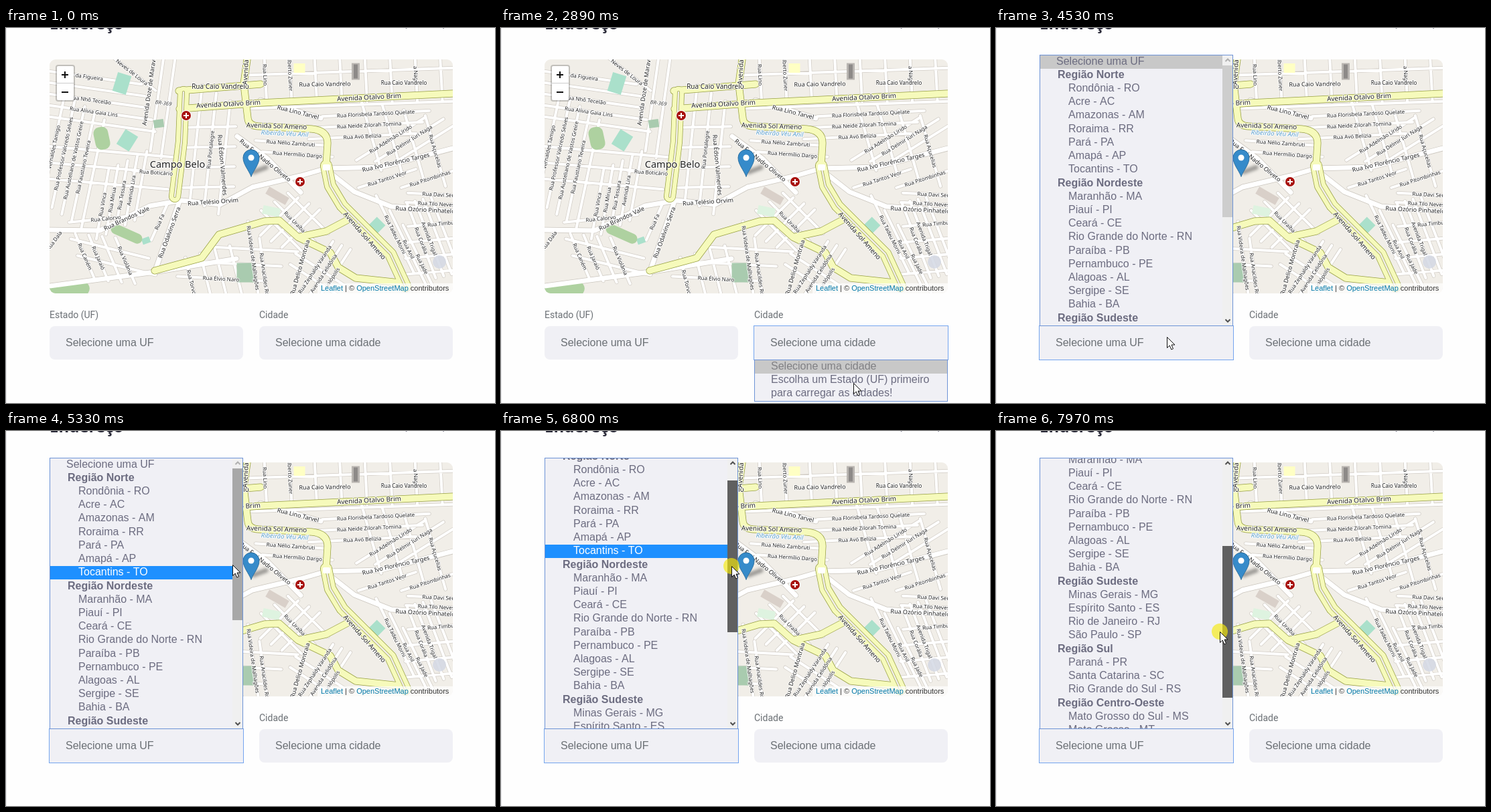
These frames come from a looping animation (730x561 px, 8000 ms). An HTML page with a canvas:

```html
<!DOCTYPE html>
<html lang="pt-BR">
<head>
<meta charset="utf-8">
<title>Endereço</title>
<style>
html, body { margin: 0; width: 100%; height: 100%; overflow: hidden; background: #fefefe; }
canvas { display: block; }
</style>
</head>
<body>
<canvas id="stage" width="730" height="561"></canvas>
<script>
const stage = document.getElementById('stage').getContext('2d');
const LOOP = 8000;
const ARIAL = '"Liberation Sans", Arial, sans-serif';
const NOTO = '"Noto Sans", sans-serif';
const ROBOTO = '14px Roboto, sans-serif';
const within = (t, from, to) => t >= from && t < to;

function text(c, str, x, y, font, color, align = 'left') {
  c.font = font;
  c.fillStyle = color;
  c.textAlign = align;
  c.fillText(str, x, y);
}

function box(c, x, y, w, h, fill, radius = 0) {
  c.fillStyle = fill;
  c.beginPath();
  c.roundRect(x, y, w, h, radius);
  c.fill();
}

function frame(c, x, y, w, h, color) {
  c.strokeStyle = color;
  c.lineWidth = 1;
  c.strokeRect(x + .5, y + .5, w - 1, h - 1);
}

function disc(c, x, y, r, fill) {
  c.fillStyle = fill;
  c.beginPath();
  c.arc(x, y, r, 0, 7);
  c.fill();
}

function line(c, path, width, color) {
  c.lineWidth = width;
  c.strokeStyle = color;
  c.stroke(path);
}

// ---------- Map ----------
const lanes = new Path2D();
const arterials = new Path2D(
  'M65 302L140 303 215 266 262 258 320 264 368 238 440 221 478 210 560 208 667 180' +
  'M345 162L390 195 440 246M258 262L222 365M65 386L222 365 344 345M380 108L470 135M478 212L520 245 575 267 667 274');
const avenues = new Path2D(
  'M259 121L380 112 667 98M258 94L380 84M360 47L355 84 361 135Q362 146 376 147L456 151Q480 153 480 172L478 206' +
  'M222 363L292 344 318 309 386 289 408 288 436 313 478 304 512 286M436 313L484 336 496 358 522 374 596 382');
const dualAvenues = new Path2D('M478 206L484 236 502 266 574 338 596 386M265 96L262 170 252 252');
const labels = [];

function label(name, x, y, angle, size = 8, color = '#222', style = '') {
  labels.push({ name, x, y, angle: angle * Math.PI / 180, font: `${style} ${size}px ${NOTO}`, color });
}

// Parallel streets, each centred on its own name; an empty name leaves the street unlabelled.
function block(names, x, y, dx, dy, angle, length) {
  const a = angle * Math.PI / 180;
  const hx = Math.cos(a) * length / 2, hy = Math.sin(a) * length / 2;
  names.split('|').forEach((name, i) => {
    const cx = x + i * dx, cy = y + i * dy;
    lanes.moveTo(cx - hx, cy - hy);
    lanes.lineTo(cx + hx, cy + hy);
    label(name, cx, cy, angle);
  });
}
const street = (name, x, y, angle, length) => block(name, x, y, 0, 0, angle, length);

function layOutStreets() {
  // North-west
  block('isco da Figueira||Rua Nhô Tecelão|Rua Alívia Gaia Lins|', 116, 72, 5, 17.7, 8, 175);
  block('Vernaldes Tamigo|Rua Professor Valcredo Selves|Rua Austeliano de Vastos Greire|Rua Faustiano Teveira|', 71, 178, 14.7, 10, -78, 165);
  block('Rua Vinca|Rua Mírua|Rua Tessara|Avenida Lira|', 144, 264, 14.3, -7, -80, 105);
  block('||', 155, 185, -4, 24, 5, 190);
  block('|', 226, 110, 16, 10, -82, 150);
  street('Rua Boticário', 224, 216, 4, 70);
  street('Neves de Loura', 188, 66, 38, 90);
  street('Rua Calorvo', 149, 285, -6, 110);
  // Centre
  block('|Rua Pontalegre|', 284, 170, 21, 12, -84, 170);
  block('||||', 306, 118, -1, 30, -1, 76);
  block('Rua Nélio Zambruti|Rua Hermílio Dargo', 425, 172, 10, 17, 4, 105);
  block('|Rua Uraíba|', 411, 303, 20, -13, 45, 85);
  block('||', 408, 282, 16, 9, -45, 80);
  // North-east
  block('Rua Lino|ilberto Zuner|||||a Naga|', 387, 70, 37.5, 0, 87, 80);
  block('|', 515, 65, 0, 50, -2, 310);
  block('Rua Florisbela Tardoso Quelate|Rua Neide Zilorah Tomina|Rua Avó Belízia', 552, 128, -10, 17, -3, 160);
  block('Rua Adelmão Lírido|Rua Delmir Iuri Naga|', 574, 166, 28, 2, -32, 120);
  block('|||Rua Açucelias', 545, 160, 32, 8, 74, 110);
  block('Rua Tantos Veor|Rua Pitombinhas', 569, 225, 64, 0, -18, 90);
  block('Rua Davi Ser|Rua Tilo Neves', 645, 249, -3, 14, 3, 90);
  // South-east
  block('Rua Timbuara|||', 655, 292, -2, 24, -5, 110);
  block('Rua Tadeu Morni|Rua Anil|Rua Jade', 581, 309, 20, 22, 64, 130);
  block('Rua Corália|Avenida Trigal||', 620, 318, 12, -3, 69, 120);
  block('Rua Zephaldy Varanda|Avenida Celidônia|valópolis', 461, 361, 13, 6, -57, 100);
  block('|', 470, 362, -8, 16, 33, 90);
  // South-west
  block('Rua Caném|Rua Jaraió||Rua Violânia', 118, 342, 20, 2, 67, 75);
  block('|', 155, 330, 10, 25, 14, 120);
  block('Rua Torvo|||', 277, 380, 22, -6, 76, 75);
  block('Rua Videira de Malhagões|Rua Anacildes Rol', 369, 344, 17, 25, 82, 110);
  block('Rua Élvio Naro||', 321, 375, 25, -22, 3, 130);
  street('Rua Dala', 72, 318, -54, 40);
  street('Rua Fa', 229, 290, -66, 60);
}

function nameAvenues() {
  label('Rua Caio Vandrelo', 320, 88, 0, 10);
  label('Avenida Otalvo Brim', 332, 114, -3, 10);
  label('Avenida Otalvo Brim', 542, 104, -3, 10);
  label('Avenida Sol Ameno', 404, 147, 2, 10);
  label('Avenida Sol Ameno', 535, 311, 49, 10);
  label('Avenida', 358, 66, -87, 10);
  // Wide white roads
  label('Rua Caio Vandrelo', 476, 84, -1, 9);
  label('Rua Caio Vandrelo', 594, 82, 0);
  label('Rua Lino Tarvel', 436, 126, 14, 9);
  label('Rua Frei Nadro Oliveto', 387, 198, 39, 9);
  label('Rua Telésio Orvim', 309, 260, -4, 9);
  label('Rua Brandos Vale', 180, 285, -25, 9);
  label('Rua Odalvino Serra', 244, 306, -70, 9);
  label('Rua Édson Valmerdes', 323, 205, 85, 9);
  label('Rua Ivo Florêncio Targes', 582, 201, -13, 9);
  label('Rua Ozório Pinhatelo', 626, 272, 3, 9);
  label('Rua Delico Montraia', 439, 358, -74, 9);
  label('Avenida Doze de Maravel', 214, 93, -82, 9);
  // Other features
  label('BR-369', 235, 112, 8, 8, '#444', 'italic');
  label('Ribeirão Véu Anil', 416, 158, 3, 9.5, '#5b9fce', 'italic');
  label('Campo Belo', 256, 206, 0, 14.5);
}

function patch(c, x, y, w, h, degrees, fill, radius = 0) {
  c.save();
  c.translate(x, y);
  c.rotate(degrees * Math.PI / 180);
  box(c, -w / 2, -h / 2, w, h, fill, radius);
  c.restore();
}

function drawAreas(c) {
  const PITCH = '#aae0cb', WOOD = '#aed1a0', GARDEN = '#a9cbaf', BUILDING = '#d9d0c9';
  patch(c, 173, 83, 21, 29, 17, PITCH);
  patch(c, 181, 168, 22, 26, 32, PITCH);
  patch(c, 553, 296, 18, 20, 45, PITCH);
  patch(c, 209, 318, 12, 9, -20, PITCH);
  patch(c, 143, 165, 22, 34, -12, WOOD, 9);
  patch(c, 180, 308, 50, 15, 24, WOOD, 8);
  patch(c, 92, 393, 66, 22, -8, WOOD, 11);
  patch(c, 358, 366, 27, 29, 0, GARDEN);
  patch(c, 228, 143, 15, 12, -8, GARDEN);
  patch(c, 396, 274, 26, 13, 12, '#def3e0');
  patch(c, 405, 251, 34, 12, 30, BUILDING);
  patch(c, 438, 60, 17, 14, 0, '#ffffc4');
  patch(c, 522, 65, 12, 25, 0, '#b9b5b1');
  patch(c, 522, 65, 6, 21, 0, '#8d8a88');
}

function drawLabel(c, { name, x, y, angle, font, color }) {
  c.save();
  c.translate(x, y);
  c.rotate(angle);
  c.font = font;
  c.textAlign = 'center';
  c.strokeStyle = 'rgba(255,255,255,.85)';
  c.lineWidth = 2;
  c.strokeText(name, 0, 3);
  text(c, name, 0, 3, font, color, 'center');
  c.restore();
}

function cross(c, x, y, size, color) {
  box(c, x - size / 2, y - 1, size, 2, color);
  box(c, x - 1, y - size / 2, 2, size, color);
}

function hospital(c, x, y) {
  disc(c, x, y, 8, '#fff');
  disc(c, x, y, 7, '#a8100c');
  cross(c, x, y, 8, '#fff');
}

function drawPin(c) {
  c.save();
  c.translate(366, 222);
  c.filter = 'blur(2px)';
  patch(c, 13, -10, 26, 7, -20, 'rgba(0,0,0,.35)', 3);
  c.filter = 'none';
  const pin = new Path2D('M0 0C-4 -10 -12 -18 -12 -28A12 12 0 0 1 12 -28C12 -18 4 -10 0 0Z');
  c.fillStyle = '#368bca';
  c.fill(pin);
  line(c, pin, 1, '#2b6f9f');
  disc(c, 0, -28, 4.5, '#fff');
  c.restore();
}

function drawRoads(c) {
  c.lineJoin = c.lineCap = 'round';
  line(c, lanes, 5.5, '#d2cdc6');
  line(c, arterials, 8.5, '#cbc6be');
  line(c, lanes, 4, '#fff');
  drawAreas(c);
  line(c, arterials, 7, '#fff');
  for (const [inset, color] of [[0, '#98a043'], [1.5, '#f6fabb']]) {
    line(c, avenues, 11 - inset, color);
    line(c, dualAvenues, 18 - inset, color);
  }
  line(c, dualAvenues, 4, '#a0a74c');
  line(c, dualAvenues, 2.5, '#f1eee8');
  box(c, 473, 204, 11, 9, '#fff', 2);
}

function drawMap(c) {
  c.save();
  c.beginPath();
  c.roundRect(65, 47, 602, 350, 9);
  c.clip();
  box(c, 65, 47, 602, 350, '#f1eee8');
  layOutStreets();
  nameAvenues();
  drawRoads(c);
  labels.forEach(l => drawLabel(c, l));
  hospital(c, 269, 131);
  hospital(c, 439, 230);
  drawPin(c);
  disc(c, 647, 350, 10, 'rgba(212,217,228,.85)');

  box(c, 74, 55, 29, 55, 'rgba(0,0,0,.2)', 4);
  box(c, 76, 57, 25, 51, '#fff', 2);
  box(c, 76, 82, 25, 1, '#ccc');
  cross(c, 88, 70, 10, '#111');
  box(c, 83, 95, 10, 2, '#111');

  box(c, 465, 382, 202, 15, 'rgba(255,255,255,.7)');
  let x = 470;
  for (const part of ['Leaflet', ' | © ', 'OpenStreetMap', ' contributors']) {
    text(c, part, x, 393, '11px ' + ARIAL, part[0] === ' ' ? '#333' : '#0078a8');
    x += c.measureText(part).width;
  }
  c.restore();
}

const INK = '#6c6c80', FIELD = '#f0f0f5', FOCUS = '#74a5ef', LIST_EDGE = '#6d93d6';
const BODY = '16px ' + ARIAL;

function drawPage(c) {
  box(c, 0, 0, 730, 561, '#fefefe');
  box(c, 0, 0, 1, 561, '#e9e9ec');
  text(c, 'Endereço', 65, 2, 'bold 24px "Open Sans", sans-serif', '#2c2c3a');
  text(c, 'Selecione o endereço no mapa', 667, -2, ROBOTO, INK, 'right');
  drawMap(c);
  text(c, 'Estado (UF)', 65, 434, ROBOTO, '#6b7075');
  text(c, 'Cidade', 378, 434, ROBOTO, '#6b7075');
}

// ---------- Selects ----------
const ROW = 20.21;
const regions = {
  'Região Norte': 'Rondônia - RO,Acre - AC,Amazonas - AM,Roraima - RR,Pará - PA,Amapá - AP,Tocantins - TO',
  'Região Nordeste': 'Maranhão - MA,Piauí - PI,Ceará - CE,Rio Grande do Norte - RN,Paraíba - PB,Pernambuco - PE,Alagoas - AL,Sergipe - SE,Bahia - BA',
  'Região Sudeste': 'Minas Gerais - MG,Espírito Santo - ES,Rio de Janeiro - RJ,São Paulo - SP',
  'Região Sul': 'Paraná - PR,Santa Catarina - SC,Rio Grande do Sul - RS',
  'Região Centro-Oeste': 'Mato Grosso do Sul - MS,Mato Grosso - MT,Goiás - GO,Distrito Federal - DF'
};
const rows = [{ name: 'Selecione uma UF', x: 90 }];
for (const [region, states] of Object.entries(regions)) {
  rows.push({ name: region, x: 92, group: true });
  states.split(',').forEach(name => rows.push({ name, x: 108 }));
}

function drawSelect(x, name, focused) {
  box(stage, x, 446, 289, 50, FIELD, focused ? 0 : 8);
  if (focused) frame(stage, x - 1, 445, 291, 52, FOCUS);
  text(stage, name, x + 24, 476, BODY, '#6b7075');
}

function drawCityList() {
  box(stage, 378, 496, 289, 63, FIELD);
  box(stage, 378, 497, 289, 20, '#c8c8c8');
  frame(stage, 378, 496, 289, 63, LIST_EDGE);
  text(stage, 'Selecione uma cidade', 403, 511, BODY, '#808084');
  text(stage, 'Escolha um Estado (UF) primeiro', 403, 531, BODY, INK);
  text(stage, 'para carregar as cidades!', 403, 551, BODY, INK);
}

// The highlight stays where the pointer left the rows for the scrollbar.
const LEAVES_ROWS = 5300, DRAG_START = 5900;

function hoveredRow(t) {
  const { y } = pointerAt(Math.min(t, LEAVES_ROWS));
  if (t < 4700 || y >= 444) return 0;
  const i = Math.floor((Math.max(y, 210) - 40.6) / ROW);
  return rows[i].group ? i + 1 : i;
}

function chevron(y, dir, color) {
  line(stage, new Path2D(`M342.5 ${y + 2 * dir}L346 ${y - 1.5 * dir}L349.5 ${y + 2 * dir}`), 2, color);
}

function drawStateList(t, pointer) {
  const dragging = t >= DRAG_START;
  const drag = dragging ? Math.max(0, pointer.y - 184) : 0;
  const scroll = Math.round(drag * 1.8);
  const active = hoveredRow(t);
  box(stage, 65, 40, 289, 406, FIELD);
  stage.save();
  stage.beginPath();
  stage.rect(66, 41, 287, 404);
  stage.clip();
  rows.forEach(({ name, x, group }, i) => {
    const on = i === active;
    if (on) box(stage, 66, Math.round(40.8 + i * ROW) - scroll, 272, 20, i ? '#1e90ff' : '#c8c8c8');
    text(stage, name, x, Math.floor(55.14 + i * ROW) - scroll, (group ? 'bold ' : '') + BODY, on && i ? '#fff' : INK);
  });
  box(stage, 338, 41, 16, 404, '#f0f0f0');
  box(stage, 338, 56 + drag, 16, 227, dragging ? '#606060' : pointer.x >= 337 ? '#a8a8a8' : '#cdcdcd');
  chevron(48, 1, drag ? '#505050' : '#b0b0b0');
  chevron(438, -1, '#505050');
  stage.restore();
  frame(stage, 65, 40, 289, 406, LIST_EDGE);
}

// ---------- Pointer ----------
const moves = [ // start, end, destination
  [540, 1240, 529, 471], [1710, 2250, 515, 541], [2420, 2890, 526, 531], [2960, 3290, 556, 516],
  [3290, 3600, 542, 478], [3860, 4250, 255, 462], [4640, 5330, 338, 200], [5400, 5570, 343, 183],
  [5870, 6270, 344, 194], [6500, 6800, 344, 202], [6870, 7350, 341, 231], [7420, 7970, 334, 300]
];
const presses = [[1310, 1550], [3610, 3760], [4290, 4520], [DRAG_START, LOOP]];

function pointerAt(t) {
  let x = 520, y = 568;
  for (const [start, end, toX, toY] of moves) {
    const p = Math.min(1, Math.max(0, (t - start) / (end - start)));
    const eased = p * p * (3 - 2 * p);
    x += (toX - x) * eased;
    y += (toY - y) * eased;
  }
  return { x: Math.round(x), y: Math.round(y) };
}

const arrow = new Path2D('M.5 .5V16.5L4.2 13 6.8 19 9.5 17.8 7 12H12Z');

function drawPointer({ x, y }, pressed) {
  if (pressed) disc(stage, x, y, 12, 'rgba(246,234,10,.65)');
  stage.save();
  stage.translate(x, y);
  stage.fillStyle = '#fff';
  stage.fill(arrow);
  line(stage, arrow, 1, '#111');
  stage.restore();
}

function render(t) {
  const pointer = pointerAt(t);
  stage.drawImage(page, 0, 0);
  drawSelect(65, 'Selecione uma UF', t >= 4370);
  drawSelect(378, 'Selecione uma cidade', within(t, 1390, 4370));
  if (within(t, 1480, 3690)) drawCityList();
  if (t >= 4450) drawStateList(t, pointer);
  drawPointer(pointer, presses.some(([from, to]) => within(t, from, to)));
}

const page = document.createElement('canvas');
page.width = 730;
page.height = 561;
drawPage(page.getContext('2d'));

const start = performance.now();
function tick() {
  render((performance.now() - start) % LOOP);
  requestAnimationFrame(tick);
}
tick();
</script>
</body>
</html>
```
